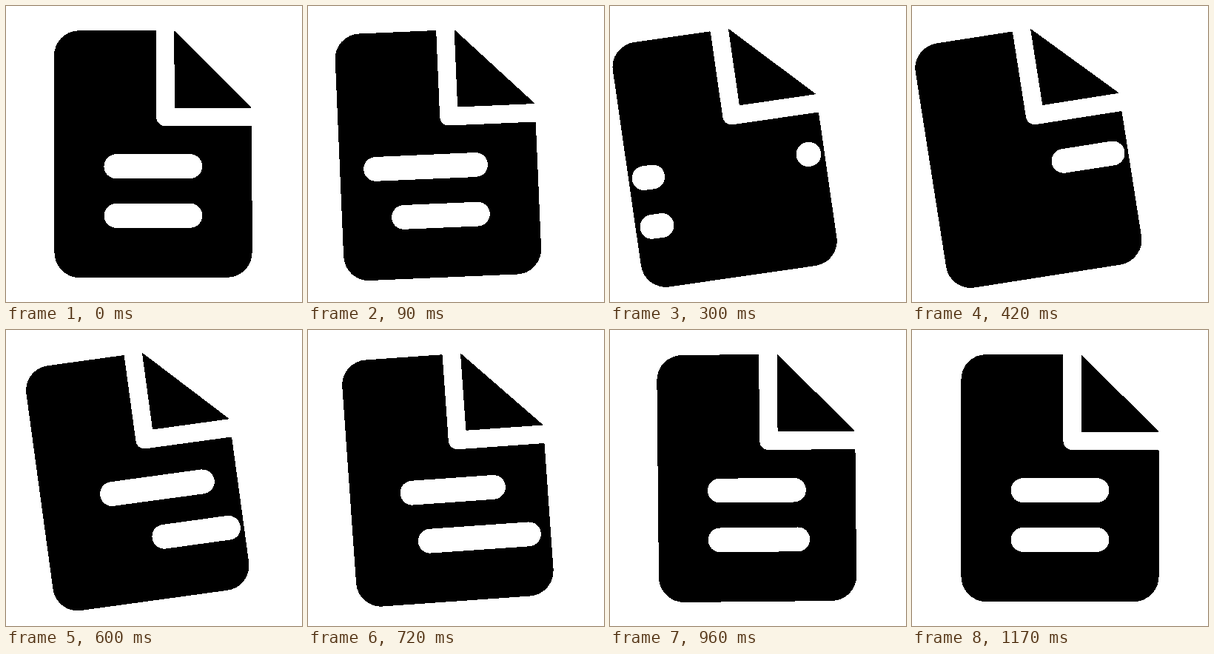
These frames come from a looping animation (400x400 px, 1.2 s). An HTML page with a canvas:

```html
<!DOCTYPE html>
<html>
<head>
<meta charset="utf-8">
<style>
  html, body { margin: 0; width: 100%; height: 100%; overflow: hidden; background: #fff; }
  canvas { display: block; width: 400px; height: 400px; }
</style>
</head>
<body>
<canvas id="stage" width="400" height="400"></canvas>
<script>
const ctx = document.getElementById('stage').getContext('2d', { willReadFrequently: true });
const SIZE = 400, LOOP = 1200, STEP = 30, PHASE = 30;
const EDGE = 112.5, REST = 50;

// Cubic bezier easing (0.333, 0, 0.2, 1), solved by bisection.
function ease(u) {
  if (u <= 0) return 0;
  if (u >= 1) return 1;
  let lo = 0, hi = 1;
  for (let i = 0; i < 24; i++) {
    const s = (lo + hi) / 2, r = 1 - s;
    const x = s * r * r + 0.6 * s * s * r + s * s * s;
    if (x < u) lo = s; else hi = s;
  }
  return lo * lo * (3 - 2 * lo);
}

const tween = (time, start, duration, from, to) =>
  from + (to - from) * ease((time - start) / duration);

// Swing out until the peak, then back to rest at the end of the loop.
const swing = (time, peak, amount) =>
  time < peak ? tween(time, 0, peak, 0, amount)
              : tween(time, peak, LOOP - peak, amount, 0);

// Each line leaves to the left, then grows back from the right.
const lines = [
  { y: 16.67, leave: [30, 158], enter: [310, 488] },
  { y: 83.33, leave: [121, 166], enter: [464, 665] }
];
const LEAVE = 255, ENTER = 485;

function drawSheet() {
  ctx.fillStyle = '#000';
  ctx.beginPath();
  ctx.moveTo(-100, -166.67);
  ctx.lineTo(4.17, -166.67);
  ctx.arcTo(4.17, -37.5, 16.67, -37.5, 12.5);
  ctx.lineTo(133.33, -37.5);
  ctx.arcTo(133.33, 166.67, 100, 166.67, 33.33);
  ctx.arcTo(-133.33, 166.67, -133.33, 133.33, 33.33);
  ctx.arcTo(-133.33, -166.67, -100, -166.67, 33.33);
  ctx.closePath();
  ctx.moveTo(29.17, -166.6);
  ctx.lineTo(133.27, -62.5);
  ctx.lineTo(29.17, -62.5);
  ctx.closePath();
  ctx.fill();
}

function drawSegment(left, right, y) {
  if (right - left < 0.3) return;
  ctx.beginPath();
  ctx.moveTo(left, y);
  ctx.lineTo(right, y);
  ctx.stroke();
}

function drawLine(time, { y, leave, enter }) {
  drawSegment(tween(time, leave[0], LEAVE, -REST, -EDGE),
              tween(time, leave[1], LEAVE, REST, -EDGE), y);
  drawSegment(tween(time, enter[0], ENTER, EDGE, -REST),
              tween(time, enter[1], ENTER, EDGE, REST), y);
}

// Reduce the picture to pure black and white for hard edges.
function harden() {
  const image = ctx.getImageData(0, 0, SIZE, SIZE), data = image.data;
  for (let i = 0; i < data.length; i += 4) {
    data[i] = data[i + 1] = data[i + 2] = data[i] < 192 ? 0 : 255;
  }
  ctx.putImageData(image, 0, 0);
}

function render(time) {
  ctx.setTransform(1, 0, 0, 1, 0, 0);
  ctx.fillStyle = '#fff';
  ctx.fillRect(0, 0, SIZE, SIZE);
  ctx.translate(200 + swing(time, 352, -45), 200);
  ctx.rotate(swing(time, 510, -9) * Math.PI / 180);
  drawSheet();
  ctx.strokeStyle = '#fff';
  ctx.lineWidth = 33.33;
  ctx.lineCap = 'round';
  for (const line of lines) drawLine(time, line);
  harden();
}

const began = performance.now();
function tick() {
  const elapsed = performance.now() - began;
  render((Math.floor(elapsed / STEP) * STEP + PHASE) % LOOP);
  requestAnimationFrame(tick);
}
tick();
</script>
</body>
</html>
```
